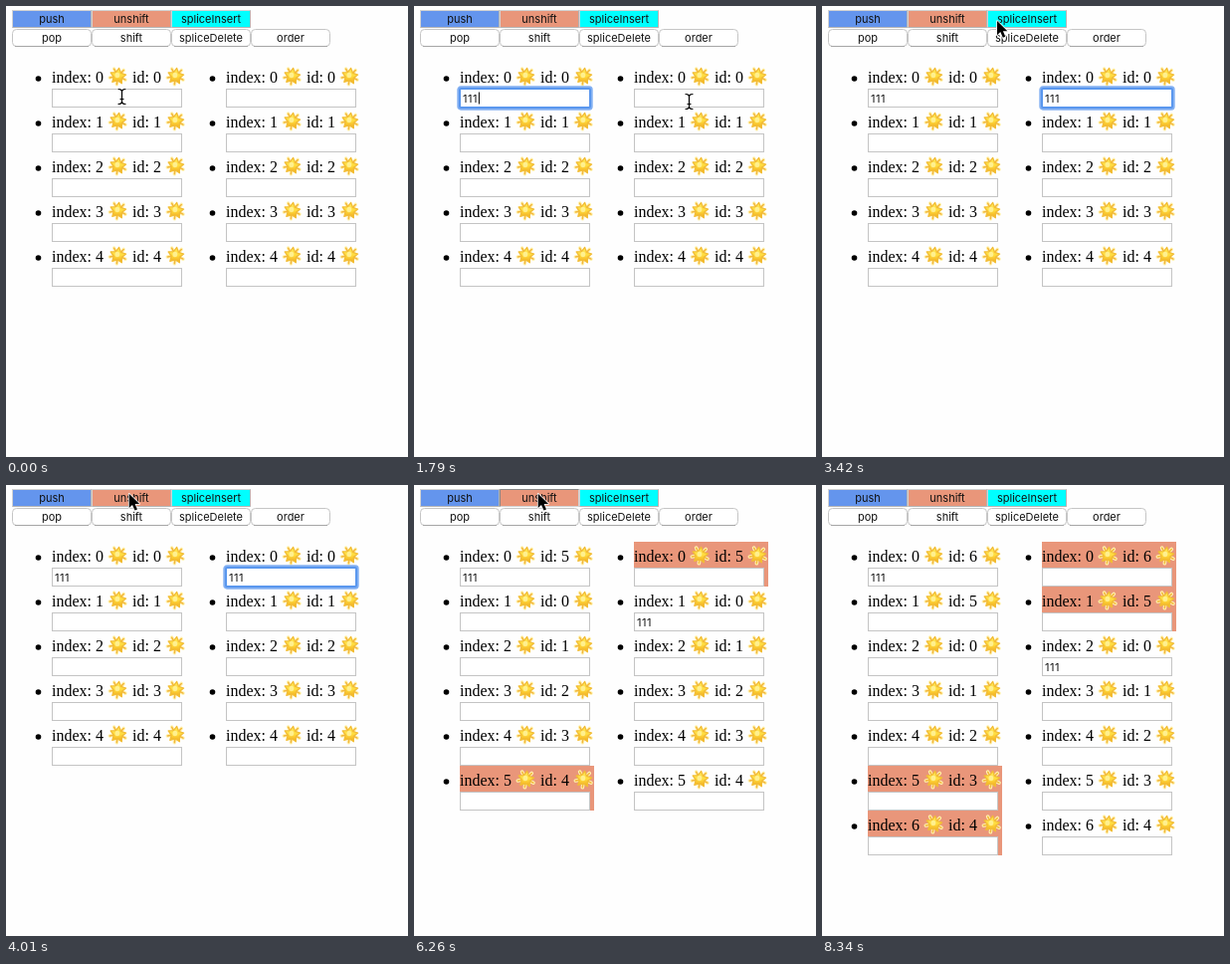
An HTML page that plays this animation: 404x453 px, repeating every 9180 ms.

```html
<!DOCTYPE html>
<html lang="en">
<head>
<meta charset="utf-8">
<title>List keys: index and id</title>
<style>
  html, body { margin: 0; width: 100%; height: 100%; overflow: hidden; background: #fefefe; }
  svg { display: block; width: 404px; height: 453px; }
  .item { font: 16px "Liberation Serif", "Times New Roman", serif; white-space: pre; }
  .ui { font: 11px Inter, Roboto, sans-serif; fill: #111; }
  .mid { text-anchor: middle; }
  .typed { letter-spacing: .5px; }
</style>
</head>
<body>
<svg viewBox="0 0 404 453">
  <defs>
    <linearGradient id="gold" x1="0" y1="0" x2="0" y2="1">
      <stop offset="0" stop-color="#ffe95a"/>
      <stop offset=".55" stop-color="#ffdb3c"/>
      <stop offset="1" stop-color="#f0a51c"/>
    </linearGradient>
    <filter id="soft" x="-10%" y="-50%" width="120%" height="200%">
      <feGaussianBlur stdDeviation=".7"/>
    </filter>
    <g id="star"></g>
    <g id="ring" fill="none" stroke="#5a97ee">
      <rect x="-1" y="-1" width="133" height="21" rx="2" stroke-width="3.4" opacity=".75" filter="url(#soft)"/>
      <rect x="0" y="0" width="131" height="19" rx="1" stroke-width="2"/>
    </g>
    <path id="arrow" d="M0 0v14.2l3.3-3.1 2.5 5.7 2.5-1.1-2.4-5.5h4.5z"
      stroke="#fff" stroke-width="1.6" paint-order="stroke" stroke-linejoin="round"/>
    <g id="beam" fill="none" stroke-linecap="round">
      <path d="M-3.5-7.5Q-.5-7.5 0-5.5Q.5-7.5 3.5-7.5M0-5.5V5.5M-3.5 7.5Q-.5 7.5 0 5.5Q.5 7.5 3.5 7.5M-1.5 2.5h3" stroke="#fff" stroke-width="2.6"/>
      <path d="M-3.5-7.5Q-.5-7.5 0-5.5Q.5-7.5 3.5-7.5M0-5.5V5.5M-3.5 7.5Q-.5 7.5 0 5.5Q.5 7.5 3.5 7.5M-1.5 2.5h3" stroke="#000" stroke-width="1.2"/>
    </g>
  </defs>
  <g id="buttons"></g>
  <g id="lists"></g>
  <use id="cursor"/>
</svg>
<script>
const LOOP = 9180, BASE = 5, PITCH = 45, COLUMN = 175;
const $ = id => document.getElementById(id);

// Each step changes only the listed parts of the state.
const steps = [
  [0, { typed: ['', ''], focus: -1, caret: false, added: 0, pressed: false, shape: 'beam', at: [116.5, 91] }],
  [300, { focus: 0, caret: true }],
  [750, { caret: false }],
  [900, { typed: ['1', ''], caret: true }],
  [1050, { typed: ['11', ''] }],
  [1200, { typed: ['111', ''] }],
  [1490, { at: [158, 93] }],
  [1640, { at: [232, 95] }],
  [1790, { at: [276.5, 96] }],
  [1940, { focus: 1 }],
  [2240, { typed: ['111', '1'] }],
  [2385, { typed: ['111', '11'] }],
  [2530, { typed: ['111', '111'] }],
  [2980, { at: [273, 91], caret: false }],
  [3127, { at: [254, 72] }],
  [3274, { at: [214, 42], shape: 'arrow' }],
  [3421, { at: [176, 15] }],
  [3568, { at: [150, 3], caret: true }],
  [3715, { at: [134, 1.5] }],
  [3862, { at: [126, 5] }],
  [4010, { at: [123.7, 8.8], caret: false }],
  [4310, { focus: -1, pressed: true }],
  [4460, { added: 1, pressed: false }],
  [5510, { at: [124.7, 8.8] }],
  [6260, { pressed: true }],
  [6400, { added: 2, pressed: false }],
  [8050, { at: [176, 108] }],
  [8195, { at: [278, 302], shape: 'beam' }],
  [8340, { shape: '' }]
];

function polar(r, deg) {
  const a = deg * Math.PI / 180;
  return (r * Math.sin(a)).toFixed(2) + ' ' + (-r * Math.cos(a)).toFixed(2);
}

function drawStar() {
  let points = '', rays = '';
  for (let i = 0; i < 5; i++) {
    const a = i * 72 + 8;
    points += (i ? 'L' : 'M') + polar(8.2, a) + 'L' + polar(4.3, a + 36);
    rays += 'M' + polar(4, a + 36) + 'L' + polar(8.3, a + 36);
  }
  $('star').innerHTML =
    `<path d="${rays}" stroke="#fff3b0" stroke-width="3.6" stroke-linecap="round"/>
     <path d="${rays}" stroke="#f3b63c" stroke-width="1.5" stroke-linecap="round"/>
     <path d="${points}z" fill="url(#gold)" stroke="#f2bd35" stroke-width="1.3" stroke-linejoin="round"/>
     <ellipse cx="-.6" cy="-1" rx="2.4" ry="2.7" fill="#fff6a8" opacity=".75"/>`;
}

function button(label, x, y, fill, pressed) {
  const flat = fill !== '#fff';
  const edge = flat
    ? `<path d="M${x + .5} ${y + 18}v-17.5h79.5" fill="none" stroke="${pressed ? '#888' : '#d2d2d2'}"/>
       <path d="M${x + .5} ${y + 17.5}h79v-17" fill="none" stroke="${pressed ? '#d2d2d2' : '#b4b4b4'}"/>`
    : `<path d="M${x + 3} ${y + 17.5}h74" stroke="#a6a6a6"/>`;
  return `<rect x="${x + .5}" y="${y + .5}" width="79" height="17" rx="${flat ? 0 : 4}" fill="${fill}" stroke="#c6c6c6"/>
    ${edge}<text class="ui mid" x="${x + 40}" y="${y + 13}">${label}</text>`;
}

function drawButtons(s) {
  const top = [['push', '#6495ed'], ['unshift', '#e9967a'], ['spliceInsert', '#0ff']];
  const low = ['pop', 'shift', 'spliceDelete', 'order'];
  return top.map(([label, fill], i) => button(label, 6 + i * 80, 4, fill, i === 1 && s.pressed)).join('') +
    low.map((label, i) => button(label, 6 + i * 80, 23, '#fff')).join('');
}

function item(index, id, hot, text, focused, caret) {
  return `${hot ? '<rect width="135" height="45" fill="#e9967a"/>' : ''}
    <circle cx="-13.5" cy="16" r="2.8"/>
    <text class="item" y="20">index: ${index}</text>
    <text class="item" x="81" y="20">id: ${id}</text>
    <use href="#star" x="66.5" y="13.5"/><use href="#star" x="124.5" y="13.5"/>
    <g transform="translate(0 26)">
      <rect x=".5" y=".5" width="130" height="18" fill="#fff" stroke="#c4c4c4"/>
      ${focused ? '<use href="#ring"/>' : ''}
      <text class="ui typed" x="3" y="14">${text}</text>
      ${caret ? `<path d="M${3.5 + 5.3 * text.length} 3.5v12" stroke="#000"/>` : ''}
    </g>`;
}

// The left list is keyed by index, the right one by id.
function drawList(s, side) {
  const n = s.added, home = side ? n : 0;
  let out = '';
  for (let i = 0; i < BASE + n; i++) {
    const id = i < n ? BASE + n - 1 - i : i - n;
    const hot = side ? i < n : i >= BASE;
    const own = i === home, focused = own && s.focus === side;
    out += `<g transform="translate(${46 + side * COLUMN} ${57 + i * PITCH})">` +
      item(i, id, hot, own ? s.typed[side] : '', focused, focused && s.caret) + '</g>';
  }
  return out;
}

function draw(count) {
  const s = Object.assign({}, ...steps.slice(0, count).map(step => step[1]));
  $('buttons').innerHTML = drawButtons(s);
  $('lists').innerHTML = drawList(s, 0) + drawList(s, 1);
  $('cursor').setAttribute('href', '#' + (s.shape || 'none'));
  $('cursor').setAttribute('transform', `translate(${s.at})`);
}

let shown = 0;
function tick() {
  const t = performance.now() % LOOP;
  const count = steps.filter(step => step[0] <= t).length;
  if (count !== shown) draw(shown = count);
  requestAnimationFrame(tick);
}

drawStar();
tick();
</script>
</body>
</html>
```
